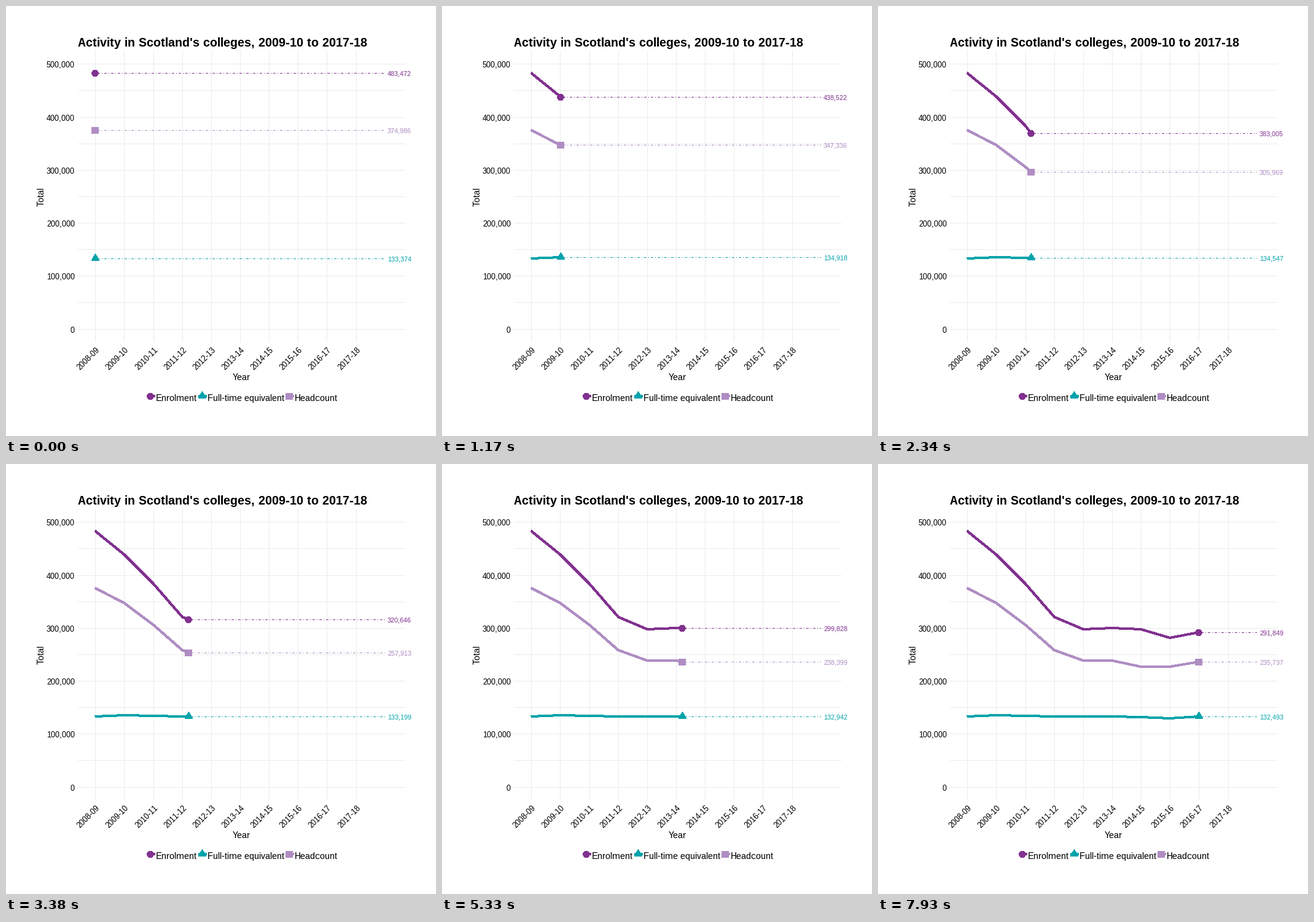
These frames come from a looping animation (700x700 px, 8000 ms). A matplotlib script:

```python
import matplotlib.pyplot as plt
from matplotlib.animation import FuncAnimation
from matplotlib.patches import Circle, Polygon, Rectangle

plt.rcParams.update({
    "font.family": "Liberation Sans",
    "text.hinting": "native",
    "text.hinting_factor": 1,
})

PX = 0.72  # points per pixel at 100 dpi
STEP_MS, TICK_MS, LOOP_MS = 130, 40, 8000
KEYS = [0, 8, 15, 23, 31, 38, 46, 54, 61]  # step at which each year is reached
GRID = "#EBEBEB"
YEARS = [f"{y}-{y - 1999:02d}" for y in range(2008, 2018)]

SERIES = [
    ("Enrolment", "#81318F", "circle", 235,
     [483472, 438522, 383005, 320646, 297681, 299828, 297938, 281051, 291849]),
    ("Full-time equivalent", "#00A3AB", "triangle", 319,
     [133374, 134918, 134547, 133199, 132428, 132942, 131809, 129500, 132493]),
    ("Headcount", "#AF8DC3", "square", 461,
     [374986, 347336, 305969, 257913, 238805, 238399, 226997, 227258, 235737]),
]

fig = plt.figure(figsize=(7, 7), dpi=100, facecolor="white")
ax = fig.add_axes([0, 0, 1, 1])
ax.set_xlim(0, 700)
ax.set_ylim(700, 0)
ax.axis("off")


# Everything sits on whole pixels, without smoothing.
def px_x(year):
    return int(145.72 + 47.15 * year)


def px_y(value):
    return int(526.1 - 86.25 * value / 1e5)


def line(xs, ys, color, width, **kw):
    return ax.plot(xs, ys, color=color, lw=width * PX, antialiased=False,
                   snap=False, solid_capstyle="butt", **kw)[0]


def text(x, y, s, size, **kw):
    kw = {"va": "baseline", "color": "black", **kw}
    return ax.text(x, y, s, fontsize=size * PX, **kw)


def marker(kind, color):
    style = dict(facecolor=color, lw=0, antialiased=False, snap=False, zorder=5)
    if kind == "circle":
        shape = Circle((0, 0), 5.2, **style)
    elif kind == "square":
        shape = Rectangle((0, 0), 12, 11, **style)
    else:
        shape = Polygon([(0, 0)] * 3, **style)
    return ax.add_patch(shape)


def move(shape, x, y):
    if isinstance(shape, Circle):
        shape.center = x, y + 0.5
    elif isinstance(shape, Rectangle):
        shape.set_xy((x - 6, y - 5))
    else:
        shape.set_xy([(x + 0.5, y - 7.4), (x + 7, y + 4), (x - 6, y + 4)])


def draw_frame():
    for v in range(0, 500001, 50000):
        row = px_y(v)
        line([117, 650], [row + 0.5] * 2, GRID, 1, zorder=1)
        if v % 100000 == 0:
            text(112, row + 6, f"{v:,}", 13, ha="right")
    for i, year in enumerate(YEARS):
        col = px_x(i)
        line([col + 0.5] * 2, [73, 547], GRID, 1, zorder=1)
        text(col - 8.5, 577, year, 13, ha="center",
             rotation=45, rotation_mode="anchor")
    text(117, 66, "Activity in Scotland's colleges, 2009-10 to 2017-18",
         20, weight="bold")
    text(383, 609, "Year", 15, ha="center")
    text(62, 310, "Total", 15, ha="center", rotation=90,
         rotation_mode="anchor")
    for name, color, kind, x, _ in SERIES:
        line([x - 6, x + 8], [635, 635], color, 3)
        move(marker(kind, color), x, 635)
        text(x + 9, 643, name, 15)


class Track:
    """One series: its trail, marker, guide line and value label."""

    def __init__(self, color, kind, values):
        self.values = values
        self.trail = line([], [], color, 3, zorder=3)
        self.guide = line([], [], color, 1, zorder=4,
                          linestyle=(0, (1, 3, 4, 3)), dash_capstyle="butt")
        self.head = marker(kind, color)
        self.label = text(621, 0, "", 11, color=color)

    def update(self, year, part):
        vals = self.values
        nxt = min(year + 1, len(vals) - 1)
        x = px_x(year + part)
        y = px_y(vals[year] + part * (vals[nxt] - vals[year]))
        self.trail.set_data([px_x(i) for i in range(year + 1)] + [x],
                            [px_y(v) for v in vals[:year + 1]] + [y])
        self.guide.set_data([x, 617], [y + 0.5] * 2)
        move(self.head, x, y)
        self.label.set_y(y + 5)
        self.label.set_text(f"{vals[nxt if part >= 0.5 else year]:,}")


def cubic_in_out(p):
    return 4 * p ** 3 if p < 0.5 else 1 - 4 * (1 - p) ** 3


def progress(step):
    """Year index and eased share of the way to the next year."""
    year = sum(k <= step for k in KEYS) - 1
    if year == len(KEYS) - 1:
        return year, 0
    return year, cubic_in_out((step - KEYS[year]) / (KEYS[year + 1] - KEYS[year]))


draw_frame()
tracks = [Track(color, kind, values) for _, color, kind, _, values in SERIES]


def update(i):
    step = (i * TICK_MS + TICK_MS - 1) // STEP_MS
    year, part = progress(step)
    for track in tracks:
        track.update(year, part)
    return []


anim = FuncAnimation(fig, update, frames=LOOP_MS // TICK_MS,
                     interval=TICK_MS, repeat=True)
plt.show()
```
